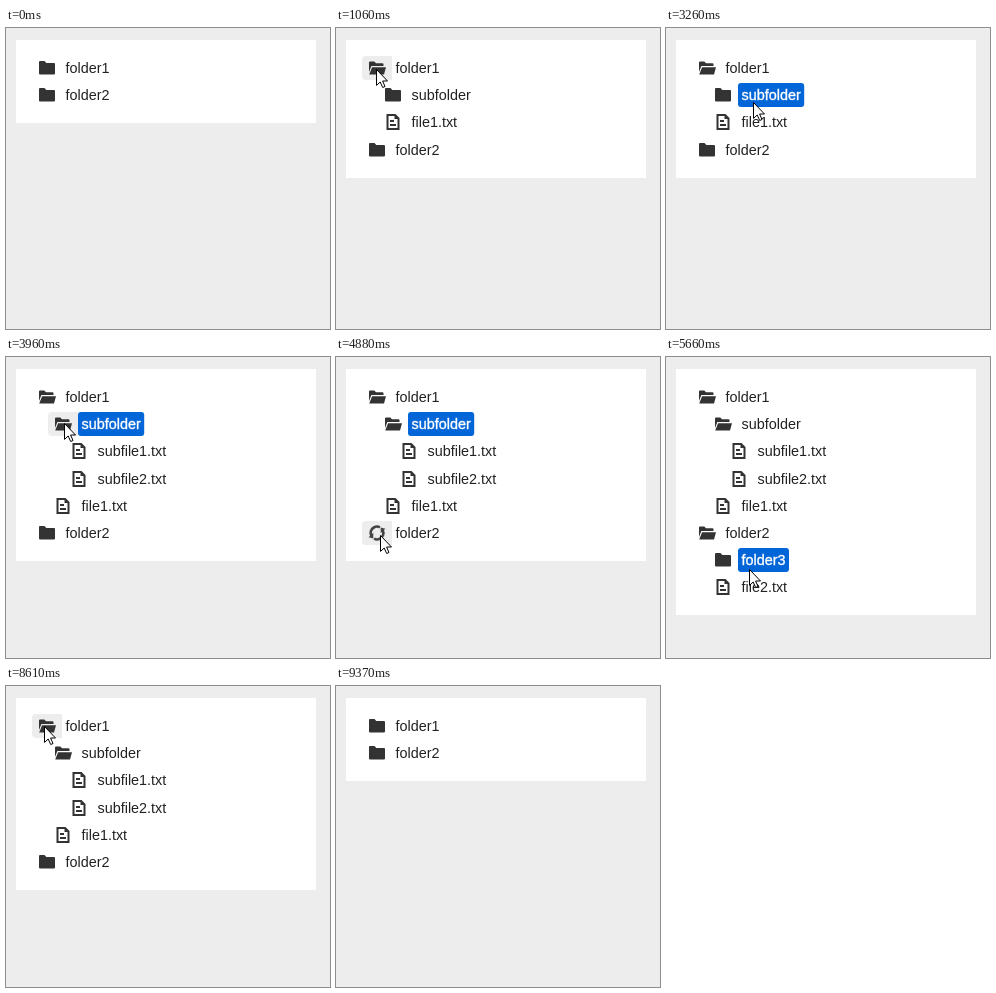
Write an HTML page with a canvas that moves like this. It is 324 px wide and 301 px high and loops after 9690 ms.

```html
<!DOCTYPE html>
<html lang="en">
<head>
<meta charset="utf-8">
<title>File tree</title>
<style>
  html, body { margin: 0; width: 100%; height: 100%; overflow: hidden; background: #ededed; }
  canvas { display: block; }
</style>
</head>
<body>
<canvas id="stage" width="324" height="301"></canvas>
<script>
const ctx = document.getElementById('stage').getContext('2d');
const LOOP = 9690, STEP = 77;
const ROW = 27.2, TOP = 28, BOX = 24, INDENT = 16, PAD = 3.5;
const INK = '#333', TEXT = '#222', HOVER = '#ededed', BLUE = '#0366d8';

const file = name => ({ name });
// wait: how long the spinner turns before the children first show
const folder = (name, wait, ...kids) => ({ name, wait, kids });

const tree = [
  folder('folder1', 150,
    folder('subfolder', 230, file('subfile1.txt'), file('subfile2.txt')),
    file('file1.txt')),
  folder('folder2', 230,
    folder('folder3', 230, file('file3.txt')),
    file('file2.txt'))
];

// Pointer path: start, duration, destination x and y
const ENTER = { t: 70, x: 186, y: 239 };
const path = [
  [147, 123, 40, 41],
  [1290, 80, 109, 83],
  [1540, 70, 102, 100],
  [2070, 80, 93, 81],
  [2300, 90, 97, 77],
  [3170, 390, 58, 66],
  [4030, 620, 44, 178],
  [5030, 230, 83, 212],
  [5890, 70, 93, 224],
  [6520, 310, 57, 203],
  [7060, 150, 48, 185],
  [7990, 620, 38, 40],
  [8840, 530, 150, 302]
];
// Each click acts on whatever lies under the pointer
const clicks = [910, 1840, 2850, 3730, 4720, 5660, 6270, 6980, 7750, 8760];

const closedIcon = new Path2D('M-8-6q0-1 1-1H-2.5L-.7-5H7q1 0 1 1V5.5q0 1-1 1H-7q-1 0-1-1z');
const openIcon = new Path2D('M-8 4V-5.5q0-1 1-1H-2.7L-1-4.8H5.5q1 0 1 1V-2H-5.6zM-4.9-.8H9L7 6.5H-7.8z');
const fileIcon = new Path2D('M-6.5-8H2.5L6.5-4V8H-6.5zM-4.5-6V6H4.5V-3H1.5V-6zM-3-2H1V0H-3zM-3 2H3V4H-3z');
const arrow = new Path2D('M.5 .5V16.4L4.2 13 6.7 18.5 9 17.5 6.6 12H11.5z');

const smooth = p => p * p * (3 - 2 * p);
const rowTop = i => Math.round(TOP + i * ROW);

function pointerAt(t) {
  if (t < ENTER.t) return null;
  let { x, y } = ENTER;
  for (const [start, span, nx, ny] of path) {
    if (t < start) break;
    const count = Math.round(span / STEP) + 1;
    const step = t >= start + span ? count : Math.floor((t - start) / STEP) + 1;
    const p = smooth(Math.min(1, step / count));
    x += (nx - x) * p;
    y += (ny - y) * p;
  }
  return { x: Math.round(x), y: Math.round(y) };
}

function listRows(opened, t, nodes = tree, depth = 0, out = []) {
  for (const node of nodes) {
    const open = opened.has(node) && t >= opened.get(node);
    out.push({ node, depth, open, loading: opened.has(node) && !open });
    if (open) listRows(opened, t, node.kids, depth + 1, out);
  }
  return out;
}

const labelX = row => 56 + row.depth * INDENT;
const labelWidth = row => ctx.measureText(row.node.name).width + PAD * 2;

function hit(rows, mouse) {
  if (!mouse) return {};
  const i = rows.findIndex((_, n) => mouse.y >= rowTop(n) && mouse.y < rowTop(n) + BOX);
  if (i < 0) return {};
  const row = rows[i], dx = mouse.x - labelX(row);
  if (dx >= -30 && dx < 0 && row.node.kids) return { node: row.node, part: 'icon' };
  if (dx >= 0 && dx < labelWidth(row)) return { node: row.node, part: 'label' };
  return {};
}

// Replays the clicks made so far
function stateAt(t) {
  const opened = new Map();
  let picked = null;
  for (const at of clicks) {
    if (at > t) break;
    const { node, part } = hit(listRows(opened, at), pointerAt(at));
    if (part === 'label') picked = node;
    if (part === 'icon' && !opened.delete(node)) opened.set(node, at + node.wait);
  }
  return { rows: listRows(opened, t), picked };
}

function box(x, y, w, radii, fill) {
  ctx.fillStyle = fill;
  ctx.beginPath();
  ctx.roundRect(x, y, w, BOX, radii);
  ctx.fill();
}

function at(x, y, paint) {
  ctx.save();
  ctx.translate(x, y);
  paint();
  ctx.restore();
}

function spinner(t) {
  ctx.rotate(t / 1000 * Math.PI * 2);
  ctx.strokeStyle = ctx.fillStyle = '#444';
  ctx.lineWidth = 2.6;
  for (let i = 0; i < 2; i++) {
    ctx.beginPath();
    ctx.arc(0, 0, 6.4, .3, 2.8);
    ctx.stroke();
    ctx.beginPath();
    ctx.moveTo(9, 2.6);
    ctx.lineTo(2.6, 2.6);
    ctx.lineTo(6.4, -1.4);
    ctx.fill();
    ctx.rotate(Math.PI);
  }
}

function drawRow(row, y, t, over, picked) {
  const { node, open, loading } = row;
  const x = labelX(row), width = labelWidth(row);
  const hovered = part => over.node === node && over.part === part;

  if (hovered('icon')) box(x - 30, y, 30, [4, 0, 0, 4], HOVER);
  if (picked) box(x, y, width, 3, BLUE);
  else if (hovered('label')) box(x, y, width, 3, HOVER);

  at(x - 15, y + 12, () => {
    if (loading) return spinner(t);
    ctx.fillStyle = INK;
    ctx.fill(!node.kids ? fileIcon : open ? openIcon : closedIcon, 'evenodd');
  });

  ctx.fillStyle = picked ? '#fff' : TEXT;
  ctx.fillText(node.name, x + PAD, y + 17);
  if (picked) {
    ctx.strokeStyle = '#fff';
    ctx.lineWidth = .35;
    ctx.strokeText(node.name, x + PAD, y + 17);
  }
}

function draw(t) {
  ctx.font = '14.4px "Liberation Sans", Arial, sans-serif';
  const { rows, picked } = stateAt(t);
  const mouse = pointerAt(t);
  const over = hit(rows, mouse);

  ctx.fillStyle = '#ededed';
  ctx.fillRect(0, 0, 324, 301);
  ctx.fillStyle = '#fff';
  ctx.fillRect(10, 12, 300, Math.round(28.8 + rows.length * ROW));
  rows.forEach((row, i) => drawRow(row, rowTop(i), t, over, row.node === picked));

  if (mouse) at(mouse.x, mouse.y, () => {
    ctx.fillStyle = '#fff';
    ctx.strokeStyle = '#000';
    ctx.lineWidth = 1;
    ctx.fill(arrow);
    ctx.stroke(arrow);
  });
}

const start = performance.now();
function tick() {
  draw((performance.now() - start) % LOOP);
  requestAnimationFrame(tick);
}
tick();
</script>
</body>
</html>
```
